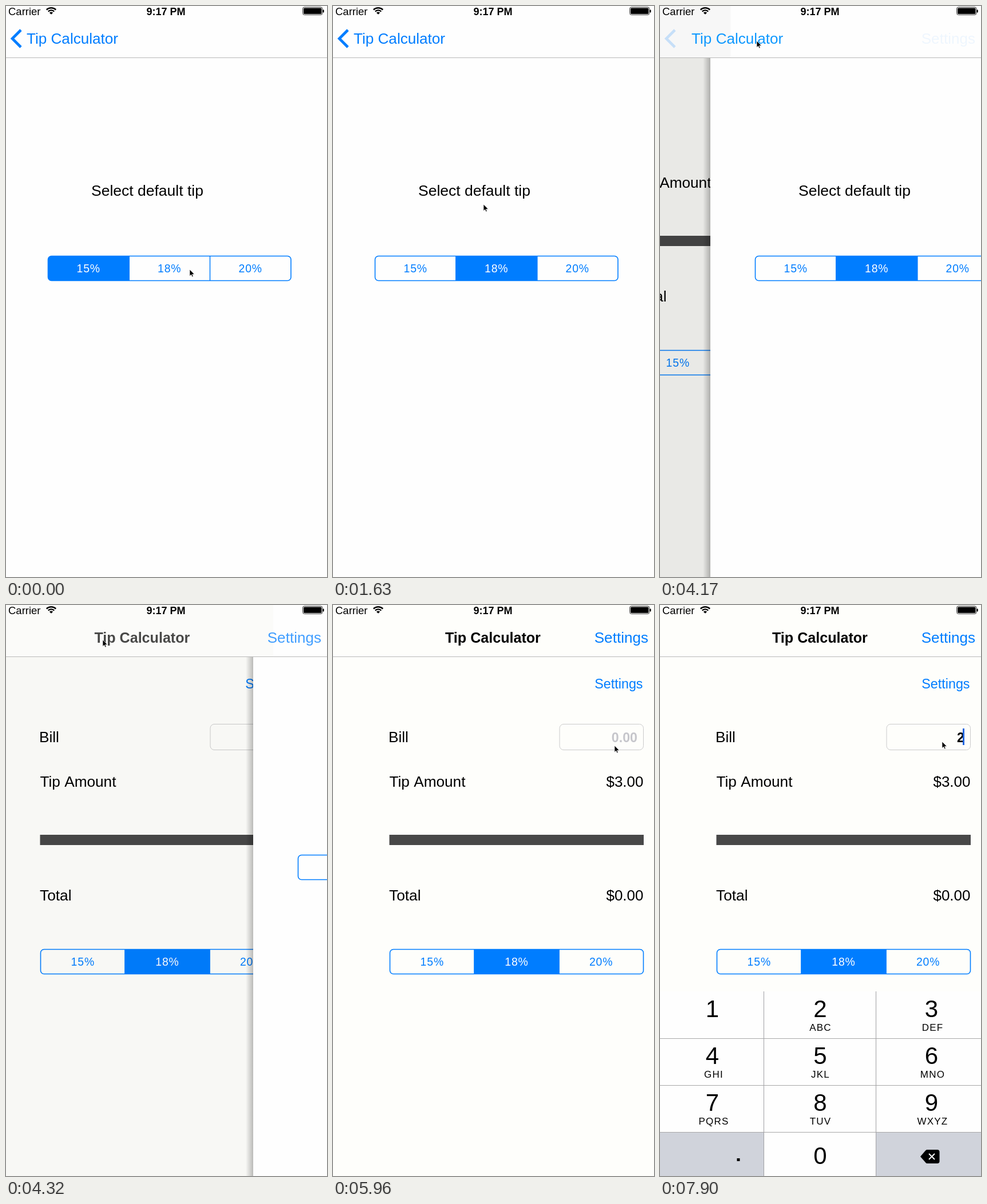
An HTML page with a canvas that plays this animation: 561 by 999 pixels, repeating every 8000 ms.

```html
<!DOCTYPE html>
<html lang="en">
<head>
<meta charset="utf-8">
<title>Tip Calculator</title>
<style>
  html, body { margin: 0; width: 100%; height: 100%; overflow: hidden; background: #fefefe; }
  canvas { display: block; }
</style>
</head>
<body>
<canvas id="stage" width="561" height="999"></canvas>
<script>
const W = 561, H = 999, LOOP = 8000, TICK = 149;
const BLUE = '#007dff', PAPER = '#fefefe', CREAM = '#fefefb', NAV = 90;
const ctx = document.getElementById('stage').getContext('2d');

// Pointer path: [tick, x, y]
const PATH = [
  [0, 321, 461], [2, 321, 461], [7, 324, 560], [10, 324, 560], [11, 263, 347],
  [15, 190, 176], [16, 190, 176], [21, 169, 61], [30, 169, 61], [31, 172, 72],
  [34, 198, 205], [35, 226, 287], [37, 226, 287], [40, 492, 246], [41, 492, 246], [42, 493, 239]
];

const clamp = v => Math.max(0, Math.min(1, v));

function box(x, y, w, h, color) {
  ctx.fillStyle = color;
  ctx.fillRect(x, y, w, h);
}

function text(str, x, y, size, { color = '#000', align = 'left', bold = false, gap = 0, alpha = 1 } = {}) {
  ctx.save();
  ctx.globalAlpha *= alpha;
  ctx.font = `${bold ? 'bold ' : ''}${size}px "Liberation Sans", Arial, sans-serif`;
  ctx.letterSpacing = gap + 'px';
  ctx.textAlign = align;
  ctx.fillStyle = color;
  ctx.fillText(str, x, y);
  ctx.restore();
}

function shape(points, color) {
  ctx.beginPath();
  points.forEach(([x, y]) => ctx.lineTo(x, y));
  ctx.closePath();
  ctx.fillStyle = color;
  ctx.fill();
}

function outline(x, y, w, h, r, color, width) {
  ctx.beginPath();
  ctx.roundRect(x, y, w, h, r);
  ctx.strokeStyle = color;
  ctx.lineWidth = width;
  ctx.stroke();
}

function segments(x, y, w, selected, pressed = -1) {
  const h = 43, part = w / 3;
  ctx.save();
  ctx.beginPath();
  ctx.roundRect(x, y, w, h, 6);
  ctx.clip();
  if (pressed >= 0) box(x + pressed * part, y, part, h, 'rgba(0,125,255,.2)');
  box(x + selected * part - .9, y, part + 1.8, h, BLUE);
  [1, 2].forEach(i => box(x + i * part - .75, y, 1.5, h, BLUE));
  ctx.restore();
  outline(x, y, w, h, 6, BLUE, 1.6);
  ['15%', '18%', '20%'].forEach((label, i) =>
    text(label, x + (i + .5) * part, y + 28.5, 19.4, {
      align: 'center', gap: .9, color: i === selected ? '#fff' : BLUE
    }));
}

function settingsPage(edge, tick) {
  if (edge > 0) {
    const shade = ctx.createLinearGradient(edge - 13, 0, edge, 0);
    shade.addColorStop(0, 'rgba(0,0,0,0)');
    shade.addColorStop(1, 'rgba(0,0,0,.25)');
    box(edge - 13, NAV, 13, H, shade);
  }
  box(edge, NAV, W, H, PAPER);
  const dx = edge > 0 ? edge + 5 : 0;
  text('Select default tip', 149 + dx, 332, 26.5);
  segments(73.5 + dx, 437.5, 424.5, tick < 2 ? 0 : 1, tick === 1 ? 1 : -1);
}

function billPage(dx, tick) {
  ctx.save();
  ctx.translate(dx, 0);
  box(-dx, NAV, W, H, CREAM);
  text('Settings', 541.5, 145.5, 23.3, { align: 'right', color: BLUE });
  text('Bill', 97, 239.5, 26.2);
  text('Tip Amount', 98.5, 318, 26.2);
  text('$3.00', 542.5, 318, 26, { align: 'right' });
  box(98.5, 402, 444.5, 18, '#484848');
  text('Total', 98, 517, 26.3);
  text('$0.00', 542.5, 517, 26, { align: 'right' });
  segments(99.5, 602.5, 443, 1);

  outline(396, 208.5, 146.5, 45, 7, '#cbcbcb', 1);
  const typed = tick >= 53;
  text(typed ? '2' : '0.00', 532, 240, 23.2, { align: 'right', bold: true, color: typed ? '#000' : '#c6c6cb' });
  if (tick >= 44) {
    ctx.globalAlpha = { 48: .5, 49: 0, 50: 0, 51: .5 }[tick] ?? 1;
    box(529, 216, 3, 29, '#2467df');
  }
  ctx.restore();
}

function keyboard(tick) {
  const drop = tick < 48 ? 46 * Math.exp(-1.55 * (tick - 45)) : 0;
  const row = 82, digitX = [91.5, 280, 474.5], letterX = [94, 280.5, 476.5];
  const letters = ['', 'ABC', 'DEF', 'GHI', 'JKL', 'MNO', 'PQRS', 'TUV', 'WXYZ'];
  ctx.save();
  ctx.translate(0, 676 + Math.round(drop));
  box(0, 0, W, 323, PAPER);
  box(0, 3 * row, 181, row, '#d0d3db');
  box(378, 3 * row, 183, row, '#d0d3db');
  letters.forEach((word, i) => {
    const col = i % 3, y = Math.floor(i / 3) * row;
    text(i + 1, digitX[col], y + 44.5, 42, { align: 'center' });
    text(word, letterX[col], y + 68.5, 17, { align: 'center', gap: 1.2 });
  });
  text('0', 280, 302, 42, { align: 'center' });
  [1, 2, 3].forEach(i => box(0, i * row, W, 1, '#a8a8a8'));
  [181, 377].forEach(x => box(x, 0, 1, 323, '#a0a0a3'));
  box(134.5, 292, 5, 5, '#000');

  // Delete key
  ctx.beginPath();
  ctx.moveTo(455, 289);
  ctx.lineTo(464, 278.5);
  ctx.arcTo(465.5, 277, 469, 277, 3);
  ctx.arcTo(488.5, 277, 488.5, 289, 4);
  ctx.arcTo(488.5, 301, 469, 301, 4);
  ctx.arcTo(465.5, 301, 464, 299.5, 3);
  ctx.closePath();
  ctx.fillStyle = '#000';
  ctx.fill();
  ctx.beginPath();
  ctx.moveTo(470, 284); ctx.lineTo(480, 294);
  ctx.moveTo(480, 284); ctx.lineTo(470, 294);
  ctx.strokeStyle = '#fff';
  ctx.lineWidth = 1.8;
  ctx.stroke();
  ctx.restore();
}

function statusBar() {
  text('Carrier', 4, 15.5, 18.5);
  text('9:17 PM', 279.5, 15.5, 18, { align: 'center', bold: true });
  const from = -Math.PI * .75, to = -Math.PI * .25;
  ctx.strokeStyle = ctx.fillStyle = '#000';
  ctx.lineWidth = 2.4;
  [7.4, 11.6].forEach(r => {
    ctx.beginPath();
    ctx.arc(79, 14.8, r, from, to);
    ctx.stroke();
  });
  ctx.beginPath();
  ctx.moveTo(79, 14.8);
  ctx.arc(79, 14.8, 4.4, from, to);
  ctx.fill();
  outline(518.5, 2, 34.5, 13.5, 3, '#333', 1);
  ctx.beginPath();
  ctx.roundRect(520, 3.5, 31.5, 10.5, 1.5);
  ctx.fill();
  ctx.beginPath();
  ctx.roundRect(553.5, 6.5, 2.2, 5, 1);
  ctx.fill();
}

function navBar(p, tick) {
  box(0, 0, W, NAV, p === 1 ? CREAM : PAPER);
  if (p > 0 && p < 1) box(0, 0, W * p + 35, NAV, p < .5 ? '#f7f7f7' : '#fbfbf9');
  box(0, NAV, W, 1, '#b9b9b9');
  const dim = tick === 27 ? .3 : 1;
  const x = 36 + 160 * p ** 1.15;

  ctx.save();
  ctx.globalAlpha = dim * clamp(1 - 5.1 * p);
  ctx.beginPath();
  ctx.moveTo(26, 42); ctx.lineTo(11, 57); ctx.lineTo(26, 72);
  ctx.strokeStyle = BLUE;
  ctx.lineWidth = 4.6;
  ctx.stroke();
  ctx.restore();

  text('Tip Calculator', x, 66, 26.1, { color: p > 0 ? '#0092ff' : BLUE, alpha: dim * clamp(1 - p * p * 2) });
  text('Tip Calculator', x, 66, 25.1, { bold: true, alpha: clamp((p - .2) / .8) });
  text('Settings', 551, 66, 26.1, { align: 'right', color: BLUE, alpha: clamp((p - .1) / .9) });
}

function pointer(tick) {
  let i = PATH.findIndex(k => k[0] > tick);
  if (i < 0) i = PATH.length;
  const a = PATH[i - 1], b = PATH[i] || a;
  const u = b === a ? 0 : (tick - a[0]) / (b[0] - a[0]);
  ctx.save();
  ctx.translate(a[1] + (b[1] - a[1]) * u, a[2] + (b[2] - a[2]) * u);
  shape([[0, 0], [0, 11.5], [2.7, 9], [4.4, 13], [6.2, 12.2], [4.6, 8.4], [8.2, 8.2]], '#000');
  ctx.strokeStyle = 'rgba(255,255,255,.85)';
  ctx.lineWidth = .8;
  ctx.stroke();
  ctx.restore();
}

// Critically damped slide of the settings page
function slide(tick) {
  if (tick < 28) return 0;
  if (tick >= 31) return 1;
  const s = .705 + 2.1 * (tick - 28);
  return 1 - (1 + s) * Math.exp(-s);
}

function draw(ms) {
  const tick = Math.floor((ms % LOOP + 12) / TICK);
  const p = slide(tick), edge = Math.round(W * p);
  box(0, 0, W, H, PAPER);
  if (p > 0) billPage(-Math.round(168 * (1 - p)), tick);
  if (p < 1) {
    if (p > 0) box(0, NAV, edge, H, `rgba(0,0,0,${.1 * (1 - p)})`);
    settingsPage(edge, tick);
  }
  navBar(p, tick);
  statusBar();
  if (tick >= 44) keyboard(tick);
  pointer(tick);
}

const start = performance.now();
function loop() {
  draw(performance.now() - start);
  requestAnimationFrame(loop);
}
loop();
</script>
</body>
</html>
```
